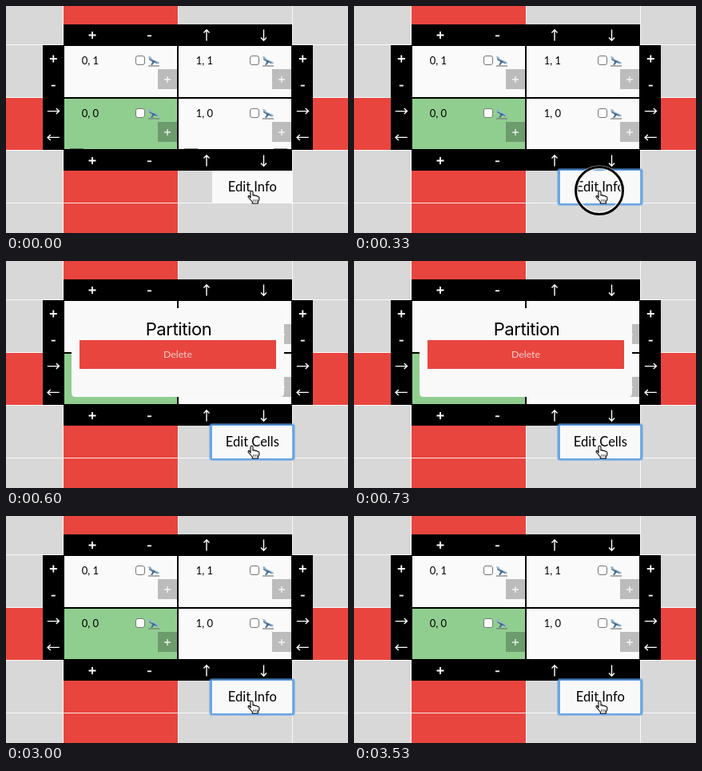
Write an HTML page that moves like this. It is 428 px wide and 284 px high and loops after 3990 ms.

```html
<!DOCTYPE html>
<html lang="en">
<head>
<meta charset="utf-8">
<title>Grid editor</title>
<style>
  html, body { margin: 0; width: 100%; height: 100%; overflow: hidden; background: #d8d8d8; }
  svg { display: block; width: 100%; height: 100%; }
  text { font-family: Lato, sans-serif; }
  .icon { fill: none; stroke: #fff; stroke-width: 1.4; }
  .bold { stroke-width: 1.8; }
</style>
</head>
<body>
<svg id="stage" viewBox="0 0 428 284">
  <defs>
    <path id="plus" class="icon bold" d="M-4.5 0H4.5M0-4.5V4.5"/>
    <path id="minus" class="icon bold" d="M-2.5 .8H2.5"/>
    <path id="right" class="icon" d="M-7.5 0H7M3.5-3.5L7.2 0 3.5 3.5"/>
    <use id="left" href="#right" transform="scale(-1 1)"/>
    <path id="up" class="icon" d="M0 7V-6.5M-3.5-3L0-6.7 3.5-3"/>
    <use id="down" href="#up" transform="scale(1 -1)"/>
    <g id="controls">
      <rect x="162.5" y="62.5" width="11" height="11" rx="2.5" fill="#fff" stroke="#777"/>
      <path d="M178 63l3 .5 2 3 8 3.5q2 2-1 2.5l-10-4.5z" fill="#8fb3d3"/>
      <path d="M182 68l5 1-4 5-2-.5 2-3z" fill="#48739f"/>
      <path d="M179 66.5l10 5" stroke="#3d5873" fill="none"/>
      <path d="M178 75h14" stroke="#777" stroke-width="1.2"/>
      <rect x="190" y="79" width="24" height="25" fill="#000" opacity=".25"/>
      <path class="icon" d="M198 92h8M202 88v8" opacity=".85"/>
    </g>
  </defs>

  <g fill="#e9453f">
    <path d="M72 0H215V284H72zM0 115H72V180H0zM358 115H428V180H358z"/>
  </g>
  <path d="M71.5 0V284M215.5 0V284M358.5 0V284M0 48.5H428M0 114.5H428M0 180.5H428M0 246.5H428"
        stroke="#fff" stroke-opacity=".85"/>
  <path d="M72 23H358V49H384V180H358V206H72V180H46V49H72z"/>
  <g id="bars"></g>
  <g id="cells"></g>
  <path id="seam" d="M80 178.5H97M223 178.5H240M335 178.5H352" stroke="#000" stroke-opacity=".45"/>

  <g id="dialog">
    <path d="M82 59H348V165q0 5-5 5H87q-5 0-5-5z" fill="#f9f9f9"/>
    <text x="216" y="93" text-anchor="middle" font-size="22" letter-spacing="-.4"
          style="font-family: Inter, sans-serif">Partition</text>
    <rect x="92" y="99" width="246" height="36" fill="#e9453f"/>
    <text x="215" y="121" text-anchor="middle" font-size="12.3" fill="#f8d0cd">Delete</text>
  </g>

  <g id="focus" fill="none" stroke="#5b9ee6">
    <rect x="256" y="205" width="104" height="43" rx="2" stroke-width="4" stroke-opacity=".5"/>
    <rect x="256.5" y="205.5" width="103" height="42" rx="1" stroke-width="2"/>
  </g>
  <rect x="258" y="206" width="100" height="41" fill="#f9f9f9"/>
  <text id="label" x="308.3" y="232" text-anchor="middle" font-size="16.5"></text>

  <g id="press" fill="none">
    <circle cx="307" cy="231" r="29" stroke="#fff" stroke-width="5" stroke-opacity=".8"/>
    <circle cx="307" cy="231" r="29.5" stroke="#000" stroke-width="3"/>
  </g>
  <path d="M306 240V233q0-1.7 1.5-1.7t1.5 1.7v4q2.2-1 2.8.6 2.2-.8 2.7.7 2.3-.2 2.3 1.7v2.5l-1.5 2.5v2h-7v-2l-5-5.5q-.8-2 1-2.2z"
        fill="#fff" stroke="#000" stroke-width="1.1" stroke-linejoin="round"/>
  <path d="M309.8 242v3M312 242v3M314.2 242v3" stroke="#000" stroke-width=".7"/>
</svg>
<script>
const LOOP = 3990;
const PRESS = 140;
const OPEN = 470;
const CLOSE = 3000;
const byId = id => document.getElementById(id);
const icon = (name, x, y) => `<use href="#${name}" x="${x}" y="${y}"/>`;

const columns = ["plus", "minus", "up", "down"];
const rows = ["plus", "minus", "right", "left"];
byId("bars").innerHTML =
  [36, 193].map(y => columns.map((name, i) => icon(name, 108 + i * 71.5, y + .5)).join("")).join("") +
  [59.3, 371.3].map(x => rows.map((name, i) => icon(name, x, 66 + i * 32.8)).join("")).join("");

function cell(col, row) {
  const fill = !col && row ? "#90ce90" : "#fafafa";
  return `<g transform="translate(${col * 143} ${row * 66})">
    <rect x="73" y="50" width="141" height="${row ? 63 : 64}" fill="${fill}"/>
    <text x="94.7" y="73" font-size="13">${col}, ${1 - row}</text>
    <use href="#controls"/></g>`;
}
byId("cells").innerHTML = cell(0, 0) + cell(1, 0) + cell(0, 1) + cell(1, 1);

function show(id, visible) {
  byId(id).style.display = visible ? "" : "none";
}

function draw(now) {
  const t = now % LOOP;
  const open = t >= OPEN && t < CLOSE;
  const pressed = [OPEN - PRESS, CLOSE - 130].some((start, i) => t >= start && t < [OPEN, CLOSE][i]);
  show("seam", t < 70);
  show("dialog", open);
  show("focus", t >= OPEN - PRESS);
  show("press", pressed);
  byId("label").textContent = open ? "Edit Cells" : "Edit Info";
}

const start = performance.now();
function tick() {
  draw(performance.now() - start);
  requestAnimationFrame(tick);
}
tick();
</script>
</body>
</html>
```
